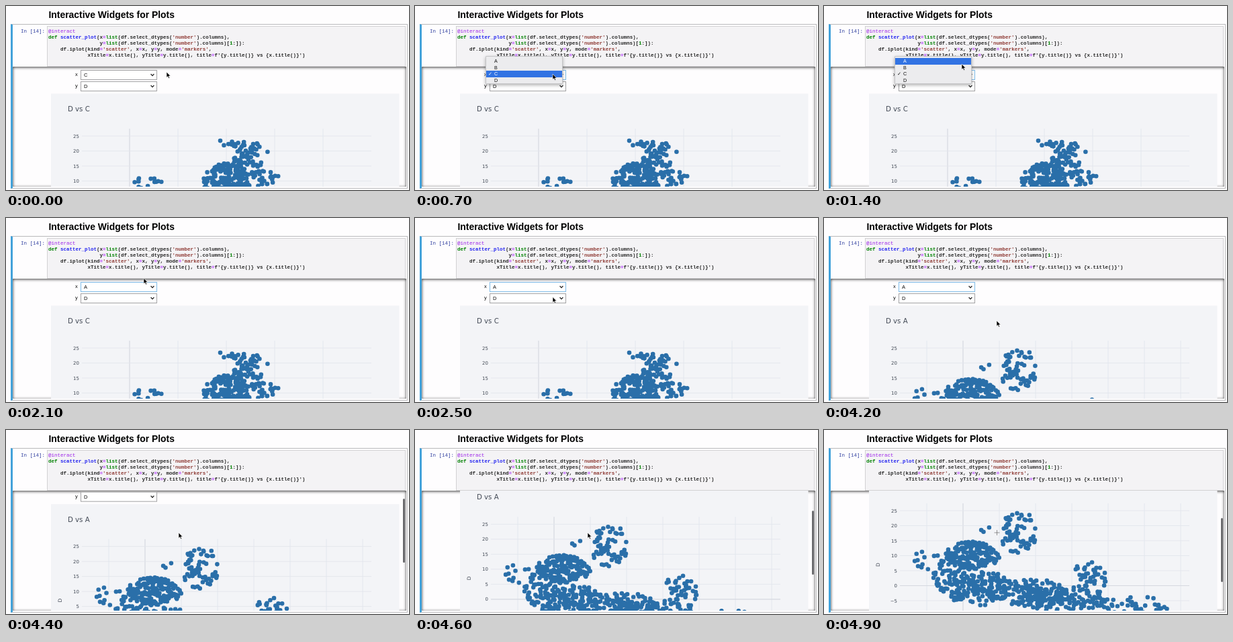
These frames come from a looping animation (600 px wide and 276 px high, 5 s). An HTML page:

```html
<!DOCTYPE html>
<html lang="en">
<head>
<meta charset="utf-8">
<title>Interactive Widgets for Plots</title>
<style>
html, body { margin: 0; width: 100%; height: 100%; overflow: hidden; background: #fefdfe; }
#stage { position: relative; width: 600px; height: 276px; overflow: hidden; font: 7.5px/10px "Liberation Sans", Arial, sans-serif; color: #111; }
#stage div, #stage svg, pre, h1 { position: absolute; margin: 0; box-sizing: border-box; }
h1 { left: 63.5px; top: 3.6px; font-size: 13.9px; line-height: 18px; color: #000; white-space: nowrap; }
#cell { left: 7px; top: 26.5px; width: 591px; height: 247px; border: 1px solid #b9b9bb; border-left: 3px solid #42a2da; }
#prompt, pre { font: 7.5px/9px "Liberation Mono", "Courier New", monospace; white-space: pre; }
#prompt { left: 22px; top: 33.5px; color: #303f9f; }
#code { left: 61px; top: 30px; width: 534px; height: 61px; background: #f4f3f5; border: 1px solid #d2d1d3; }
pre { left: 63px; top: 33.7px; font-weight: bold; color: #262626; }
.meta { color: #9a1fe8; font-weight: normal; }
.op { color: #a2f; }
.kw { color: #008000; }
.fn { color: #2222f0; }
.str { color: #8f3b35; }
#output { left: 10px; top: 91px; width: 586px; height: 179.5px; overflow: hidden; border-radius: 1px; box-shadow: inset 0 1px 4px rgba(0,0,0,.8); }
#content { left: -10px; top: -91px; width: 600px; height: 500px; }
.label { left: 103px; }
.select { left: 111px; width: 113.5px; height: 15px; padding-left: 4px; line-height: 13px; background: #fff; border: 1px solid #a2a2a4; }
.select.focus { border-color: #7fbce9; }
.select svg { right: 2.5px; top: 4px; }
#thumb { left: 580.5px; width: 3.6px; height: 96px; border-radius: 2px; background: #69696c; }
#menu { left: 105px; top: 75.2px; width: 114.5px; height: 41.5px; padding-top: 2px; background: #ececee; border: .5px solid #c4c4c6; border-radius: 1px; box-shadow: 0 2px 5px rgba(0,0,0,.3); }
#menu p { position: relative; margin: 0; height: 9.6px; padding-left: 12px; font-size: 7.2px; line-height: 9.8px; }
#menu p.on { background: #3273e3; color: #fff; }
#menu .tick::before { content: "✓"; position: absolute; left: 3px; font-family: "DejaVu Sans", sans-serif; }
svg { overflow: visible; }
svg text { font-family: "DejaVu Sans", Verdana, sans-serif; fill: #434a56; }
</style>
</head>
<body>
<div id="stage">
  <h1>Interactive Widgets for Plots</h1>
  <div id="cell"></div>
  <div id="prompt">In [14]:</div>
  <div id="code"></div>
<pre><span class="meta">@interact</span>
<span class="kw">def</span> <span class="fn">scatter_plot</span>(x<span class="op">=</span><span class="kw">list</span>(df.select_dtypes(<span class="str">'number'</span>).columns),
                 y<span class="op">=</span><span class="kw">list</span>(df.select_dtypes(<span class="str">'number'</span>).columns)[<span class="kw">1</span>:]):
    df.iplot(kind<span class="op">=</span><span class="str">'scatter'</span>, x<span class="op">=</span>x, y<span class="op">=</span>y, mode<span class="op">=</span><span class="str">'markers'</span>,
             xTitle<span class="op">=</span>x.title(), yTitle<span class="op">=</span>y.title(), title<span class="op">=</span>f'{y.title()} vs {x.title()}')</pre>
  <div id="output">
    <div id="content">
      <div class="label" style="top:98px">x</div>
      <div class="label" style="top:115px">y</div>
      <div class="select" id="selX" style="top:95.5px"><span>C</span></div>
      <div class="select" id="selY" style="top:112.5px"><span>D</span></div>
      <svg id="plots" width="600" height="500"></svg>
    </div>
    <div id="thumb"></div>
  </div>
  <div id="menu"><p>A</p><p>B</p><p class="tick">C</p><p>D</p></div>
  <svg id="cursor" width="10" height="12">
    <path id="arrow" d="M0 0V8.3L1.9 6.6L3.2 9.6L4.6 9L3.3 6.1H5.9Z" fill="#000" stroke="#fff" stroke-width=".6"/>
    <path id="cross" d="M-3.5 0H4.5M.5 -4V4" stroke="#666" stroke-width=".7"/>
  </svg>
</div>
<script>
const $ = id => document.getElementById(id);
const LOOP = 5000, STEP = 100, MAX_SCROLL = 74;

for (const s of document.querySelectorAll('.select'))
  s.insertAdjacentHTML('beforeend',
    '<svg width="6" height="5"><path d="M.6 1L3 3.6L5.4 1" fill="none" stroke="#222" stroke-width="1.3"/></svg>');

function random(seed) {
  return () => (seed = (seed * 16807) % 2147483647) / 2147483647;
}

// A seeded, elliptical cloud of dots, slightly denser in the middle.
function cloud(cx, cy, rx, ry, count) {
  const rnd = random(Math.round(cx * cy));
  let d = '';
  for (let i = 0; i < count; i++) {
    const a = rnd() * 2 * Math.PI, r = rnd() ** .55;
    d += `M${(cx + rx * r * Math.cos(a)).toFixed(1)} ${(cy + ry * r * Math.sin(a)).toFixed(1)}h.01`;
  }
  return d;
}

function plot(id, title, first, gap, zero, marks) {
  let grid = '', ticks = '';
  const line = (path, strong) =>
    grid += `<path d="${path}" stroke="${strong ? '#d5d8df' : '#e3e6ec'}" stroke-width="${strong ? 1.2 : .9}"/>`;
  for (let x = first; x < 540; x += gap) line(`M${x} 184V420`, x === zero);
  for (let v = 25; v >= -10; v -= 5) {
    const y = 195 + (25 - v) * 4.5;
    line(`M113 ${y}H544`, v === 0);
    ticks += `<text x="109" y="${y + 2.6}" font-size="7" text-anchor="end">${v < 0 ? '−' + -v : v}</text>`;
  }
  return `<g id="${id}"><rect x="67" y="131.5" width="518.5" height="340" fill="#f3f4f7"/>${grid}${ticks}
    <text x="92" y="158" font-size="10.2">${title}</text>
    <text transform="translate(82.5 276) rotate(-90)" font-size="7.5" text-anchor="middle">D</text>
    <path d="${marks}" stroke="#2a6fa9" stroke-width="6.6" stroke-linecap="round"/></g>`;
}

const marksC =
  cloud(337, 204, 19, 8, 10) + cloud(366, 222, 24, 22, 44) + cloud(346, 237, 15, 12, 16) +
  cloud(328, 262, 36, 26, 190) + cloud(372, 258, 36, 13, 34) + cloud(212, 269, 28, 13, 22);

const marksA =
  cloud(290, 228, 28, 32, 62) + cloud(154, 268, 22, 15, 12) + cloud(240, 221, 8, 7, 3) +
  cloud(222, 262, 41, 21, 165) + cloud(196, 296, 34, 34, 115) + cloud(238, 312, 40, 26, 115) +
  cloud(305, 318, 55, 21, 125) + cloud(355, 329, 65, 18, 130) + cloud(394, 298, 26, 27, 48) +
  cloud(460, 336, 58, 13, 36);

$('plots').innerHTML =
  plot('plotC', 'D vs C', 184, 72, 184, marksC) + plot('plotA', 'D vs A', 153, 54, 207, marksA);

const clamp = u => Math.min(1, Math.max(0, u));
const ease = u => u * u * (3 - 2 * u);
const progress = (t, from, to) => ease(clamp((t - from) / (to - from)));

// To the x list, up to its first item, down to the y list, then into the plot.
function cursorAt(t) {
  const reach = progress(t, 0, 600), leave = progress(t, 2800, 3100);
  return [
    239 - 34 * reach + 52 * leave,
    99 + 3 * reach - 15 * progress(t, 1000, 1400) + 31.5 * progress(t, 2000, 2500) + 35.5 * leave
  ];
}

const scrollAt = t => MAX_SCROLL * ease(1 - (1 - clamp((t - 4200) / 700)) ** 1.257);
const show = (id, on) => { $(id).style.display = on ? '' : 'none'; };
const items = [...document.querySelectorAll('#menu p')];

function render(t) {
  const [x, y] = cursorAt(t), scroll = scrollAt(t), cross = t >= 4700;
  $('cursor').style.transform = `translate(${x}px, ${y}px)`;
  show('arrow', !cross);
  show('cross', cross);

  show('menu', t >= 700 && t < 2100);
  const hover = Math.max(0, Math.floor((y - 77.5) / 9.6));
  items.forEach((p, i) => p.classList.toggle('on', i === hover));

  $('selX').classList.toggle('focus', t >= 700);
  $('selX').firstChild.textContent = t < 2100 ? 'C' : 'A';
  show('plotC', t < 3400);
  show('plotA', t >= 3800);

  $('content').style.transform = `translateY(${-scroll}px)`;
  show('thumb', scroll > 0);
  $('thumb').style.top = `${1 + scroll * .54}px`;
}

const begin = performance.now();
function tick() {
  const t = (performance.now() - begin) % LOOP;
  render(Math.floor(t / STEP) * STEP);
  requestAnimationFrame(tick);
}
tick();
</script>
</body>
</html>
```
